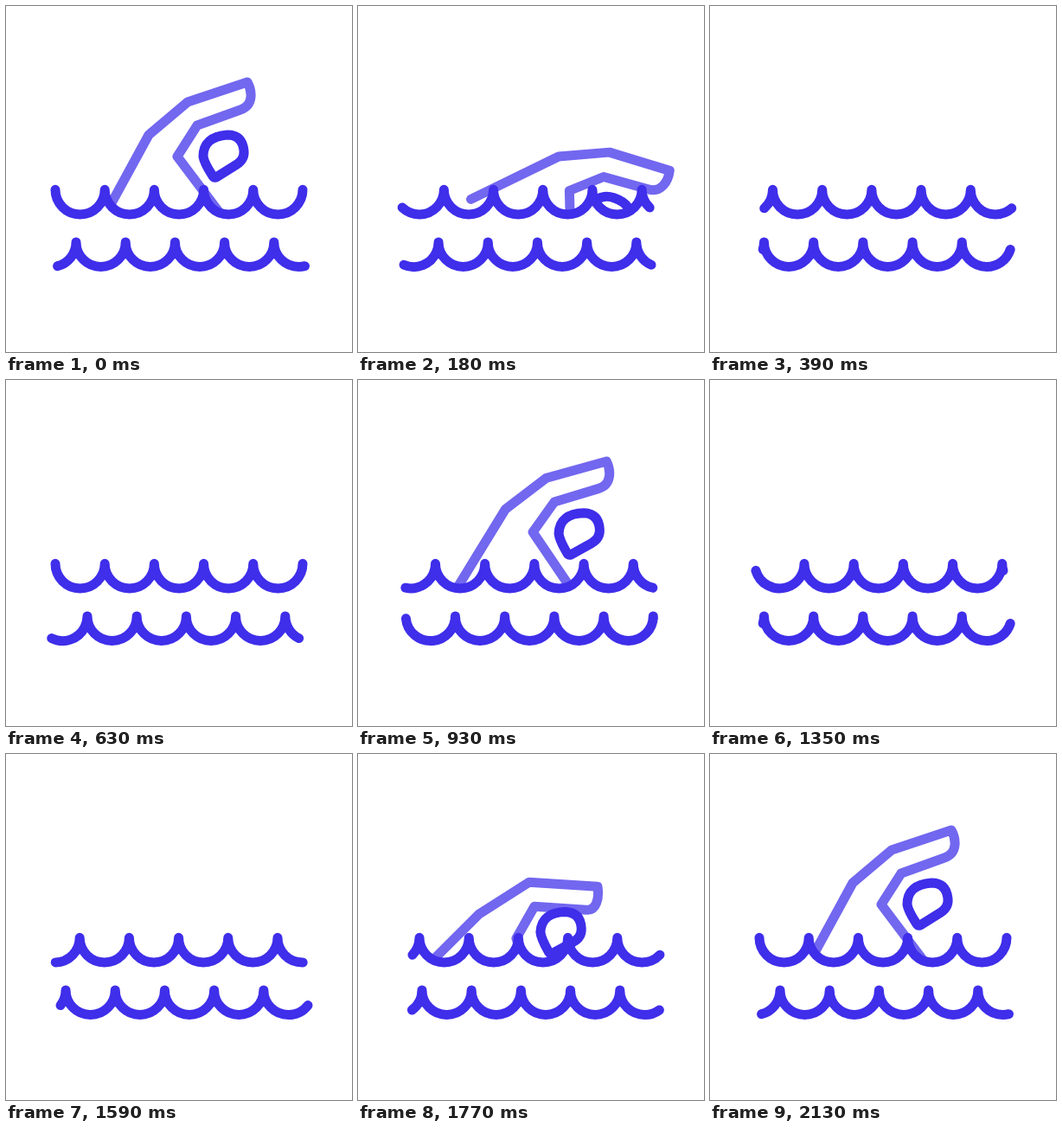
Recreate the animation shown at these times as an HTML page with a canvas. Size 400x400 px, loop 2730 ms.

```html
<!DOCTYPE html>
<html lang="en">
<head>
<meta charset="utf-8">
<title>Swimmer</title>
<style>
html, body { margin: 0; width: 100%; height: 100%; overflow: hidden; background: #fff; }
canvas { display: block; }
</style>
</head>
<body>
<canvas id="stage" width="400" height="400"></canvas>
<script>
const ctx = document.getElementById('stage').getContext('2d');
const LOOP = 2730, END = 2130, STEP = 30;
const DARK = '#3f2eea', LIGHT = '#7267ef';
const ARC = 57.2, R = ARC / 2, LEFT = 57, SURFACE = 212.3;

// Arm outline: raised, and while still surfacing
const RAISED = [[111, 248], [165, 149], [210, 111], [279, 88], [285, 99], [286, 115], [271, 120], [221, 138], [198, 174], [250, 243]];
const RISING = [[76, 249], [140, 185], [198, 148], [277, 153], [279, 166], [276, 181], [264, 180], [204, 176], [183, 213], [203, 275]];
const HEAD = new Path2D('M243 198L267 183Q276 177 275 167Q273 149 256 149Q228 151 228 174Q229 181 238 195Q240 199 243 198Z');

// Drift of each wave, counted in arcs
const TIMES = [0, 390, 630, 930, 1350, 1770, END];
const UPPER = [0, .729, 1, 1.432, 2.091, 2.755, 3];
const LOWER = [0, .676, 1.227, 1.55, 1.676, 1.877, 2];

const clamp = x => Math.max(0, Math.min(1, x));
const smooth = x => x * x * (3 - 2 * x);

// Monotone cubic through the given values, at rest on both ends
function drift(values, t) {
  const rate = i => (values[i + 1] - values[i]) / (TIMES[i + 1] - TIMES[i]);
  const slope = i => i === 0 || i === TIMES.length - 1 ? 0
    : 2 * rate(i - 1) * rate(i) / (rate(i - 1) + rate(i));
  let i = 0;
  while (i < TIMES.length - 2 && t >= TIMES[i + 1]) i++;
  const span = TIMES[i + 1] - TIMES[i], x = (t - TIMES[i]) / span;
  return values[i] + (values[i + 1] - values[i]) * smooth(x)
    + span * x * (1 - x) * ((1 - x) * slope(i) - x * slope(i + 1));
}

// Half circles slide by u while the visible stretch advances by u along them
function traceWave(u, y, from, to) {
  for (let i = Math.floor(from); i < to; i++) {
    const a = clamp(from - i), b = clamp(to - i);
    ctx.arc(LEFT + ARC * (i + .5 - u), y, R, Math.PI * (1 - a), Math.PI * (1 - b), true);
  }
}

function drawWave(u, y) {
  ctx.strokeStyle = DARK;
  ctx.beginPath();
  traceWave(u, y, u, u + 5);
  ctx.stroke();
}

function clipAboveWater(u) {
  const first = Math.floor(u) - 2;
  ctx.beginPath();
  traceWave(u, SURFACE, first, first + 11);
  ctx.lineTo(600, 0);
  ctx.lineTo(-200, 0);
  ctx.closePath();
  ctx.clip();
}

// depth: how far below the raised pose; dive: 0 raised, 1 submerged
function drawSwimmer(depth, dive) {
  ctx.translate(182 + 65 * dive, 215 + 30 * dive + 70 * dive * dive);
  ctx.rotate(dive * Math.PI / 2);
  ctx.translate(-182, -215);

  const p = RAISED.map((a, i) => a.map((v, k) => v + depth * (RISING[i][k] - v)));
  ctx.strokeStyle = LIGHT;
  ctx.beginPath();
  p.slice(0, 4).forEach(q => ctx.lineTo(...q));
  ctx.bezierCurveTo(...p[4], ...p[5], ...p[6]);
  p.slice(7).forEach(q => ctx.lineTo(...q));
  ctx.stroke();

  ctx.translate(251 - 17 * depth, 173 + 33 * depth);
  ctx.rotate(.06 * depth);
  ctx.translate(-251, -173);
  ctx.strokeStyle = DARK;
  ctx.stroke(HEAD);
}

function stroke(t) {
  const dive = start => drawSwimmer(0, smooth(clamp((t - start) / 420)));
  const rise = (start, end) => drawSwimmer(3.6 * (1 - clamp((t - start) / (end - start))) ** 3.3, 0);
  if (t < 390) dive(0);
  else if (t >= 640 && t < 885) rise(640, 885);
  else if (t >= 885 && t < 1290) dive(885);
  else if (t >= 1600) rise(1600, END);
}

function frame(now) {
  const t = Math.min(END, Math.floor(now % LOOP / STEP) * STEP);
  const upper = drift(UPPER, t), lower = .58 - drift(LOWER, t);
  ctx.fillStyle = '#fff';
  ctx.fillRect(0, 0, 400, 400);
  ctx.lineWidth = 11;
  ctx.lineCap = ctx.lineJoin = 'round';
  ctx.save();
  clipAboveWater(upper);
  stroke(t);
  ctx.restore();
  drawWave(upper, SURFACE);
  drawWave(lower, 273);
  requestAnimationFrame(frame);
}

const begin = performance.now();
(function tick() {
  const loop = frame;
  loop(Math.max(0, performance.now() - begin));
})();
</script>
</body>
</html>
```
